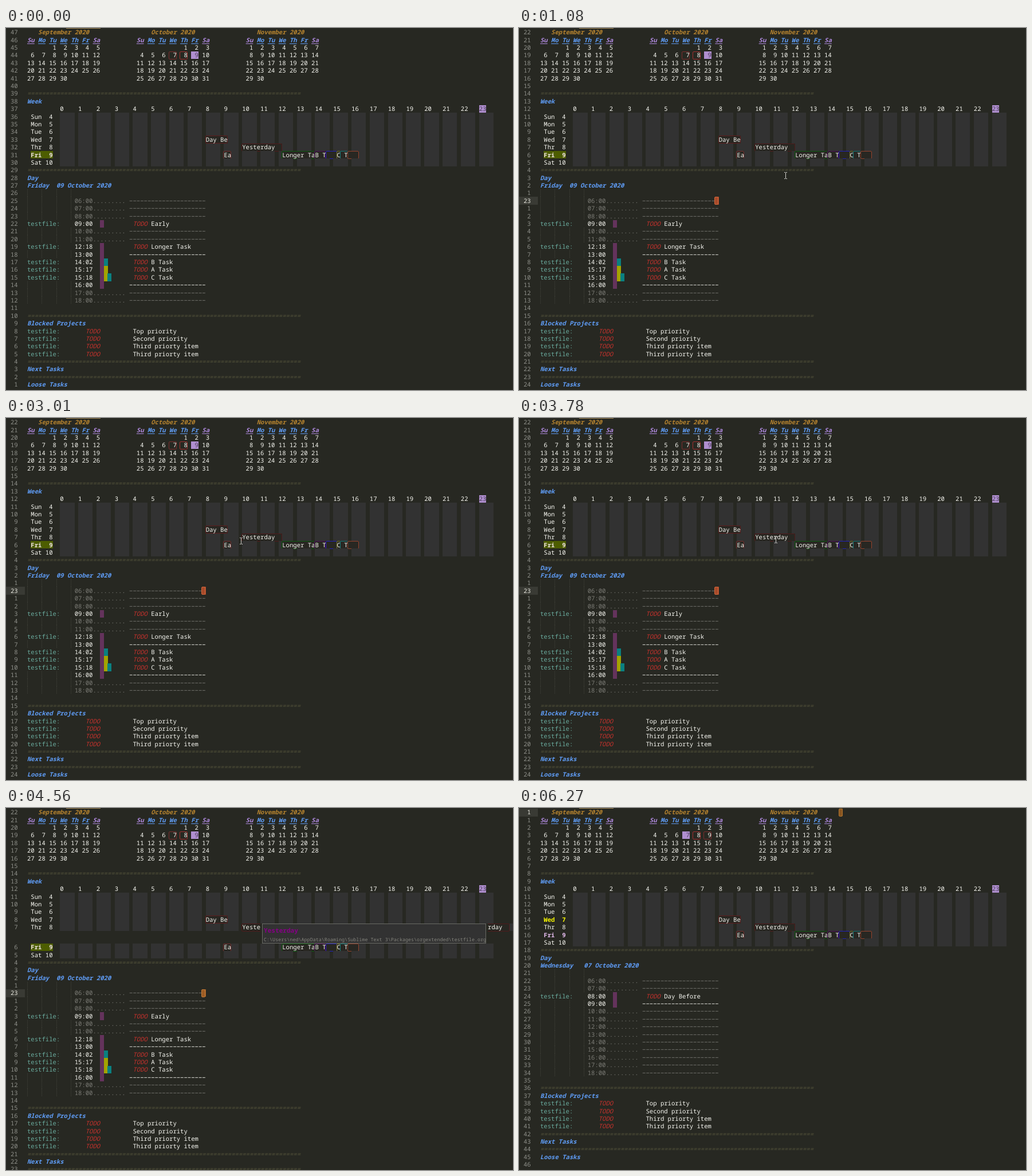
An HTML page with a canvas that plays this animation: 885 px wide and 633 px high, repeating every 8 s.

```html
<!DOCTYPE html>
<html lang="en">
<head>
<meta charset="utf-8">
<title>Agenda</title>
<style>
  html, body { margin: 0; width: 100%; height: 100%; overflow: hidden; background: #272822; }
  canvas { display: block; }
</style>
</head>
<body>
<canvas id="stage" width="885" height="633"></canvas>
<script>
const W = 885, H = 633, LOOP = 8000;
const CHAR = 6.36, LINE = 13.39, LEFT = 37, TOP = 7.5, SIZE = CHAR / 0.6;
const FONT = '"Noto Sans Mono", "DejaVu Sans Mono", monospace';
const C = {
  bg: '#272822', text: '#f8f8f2', dim: '#7c7c76', blue: '#5f9cf5', lilac: '#b08ae0',
  title: '#b5832f', rule: '#56553c', file: '#6aab9e', todo: '#c8322d', bar: '#323232',
  mark: '#b08fd0', plum: '#64335c', teal: '#0a8080', olive: '#a3a300', gutter: '#8f908a'
};
const DAYS = ['Sun', 'Mon', 'Tue', 'Wed', 'Thr', 'Fri', 'Sat'];
const MONTHS = [
  { name: 'September 2020', at: 3, col: 0, first: 2, days: 30 },
  { name: 'October 2020', at: 34, col: 30, first: 4, days: 31 },
  { name: 'November 2020', at: 63, col: 60, first: 0, days: 30 }
];
// day index, column, width in characters, label, border
const TASKS = [
  [3, 49, 6, 'Day Be', '#5c1c1c'],
  [4, 59, 11, 'Yesterday', '#4f1a1a'],
  [5, 54, 2, 'Ea', '#743030'],
  [5, 70, 9, 'Longer Ta', '#0b5a0f'],
  [5, 79, 3, 'B T', '#4b1058'],
  [5, 82, 3, '', '#2222b8'],
  [5, 85, 1, 'C', '#77772c'],
  [5, 86, 2, ' T', '#147a7a'],
  [5, 88, 3, '', '#94432d']
];
// blocks: column, agenda row, row count, colour
const VIEWS = {
  fri: {
    date: 9, heading: 'Friday  09 October 2020',
    slots: '06:00|07:00|08:00|09:00=Early|10:00|11:00|12:18=Longer Task|13:00+|14:02=B Task|15:17=A Task|15:18=C Task|16:00+|17:00|18:00',
    blocks: [[20, 3, 1, C.plum], [20, 6, 6, C.plum], [21, 8, 1, C.teal], [21, 9, 2, C.olive], [22, 10, 1, C.teal]]
  },
  thu: {
    date: 8, heading: 'Thursday    08 October 2020', dayColor: '#d8d500',
    slots: '06:00|07:00|08:00|09:00|10:02=Yesterday|11:00+|12:00+|13:00|14:00|15:00|16:00|17:00|18:00',
    blocks: [[20, 4, 3, C.plum]]
  },
  wed: {
    date: 7, heading: 'Wednesday   07 October 2020', dayColor: '#f8f800',
    slots: '06:00|07:00|08:00=Day Before|09:00+|10:00|11:00|12:00|13:00|14:00|15:00|16:00|17:00|18:00',
    blocks: [[20, 2, 2, C.plum]]
  }
};
const SCENES = [
  { from: 0, view: 'fri', number: i => 47 - i },
  { from: 700, view: 'fri', line: 22, caret: [48, '#a64a2a', '#d0663c'] },
  { from: 4160, view: 'fri', line: 22, caret: [48, '#9c5c24', '#c07a38'], popup: true },
  { from: 5720, view: 'thu', line: 0, caret: [82, '#8a5620', '#b0762f'] },
  { from: 6270, view: 'wed', line: 0, caret: [82, '#8a5620', '#b0762f'] }
];
// pointer moves: start, end, steps, path
const MOVES = [
  [70, 450, 6, [[764, 531], [518, 309]]],
  [700, 770, 2, [[517, 309], [516, 308]]],
  [1080, 1860, 11, [[465, 258], [400, 150], [330, 28], [310, 54]]],
  [1930, 2090, 3, [[300, 52], [281, 53]]],
  [2240, 2780, 8, [[297, 48], [414, 220]]],
  [3010, 3780, 11, [[410, 215], [377, 190], [400, 171], [435, 253], [448, 213]]]
];
const POINTER_HIDDEN = 4560;
const SPLIT_COL = 64, POPUP_SHIFT = 397, POPUP_GAP = 21.6;

const screen = document.getElementById('stage').getContext('2d');
const layer = document.createElement('canvas');
layer.width = W;
layer.height = H;
const g = layer.getContext('2d');
let gap = 0;

const x = col => LEFT + col * CHAR;
const y = row => TOP + row * LINE + (row > 15 ? gap : 0);

function rect(left, top, w, h, color) {
  g.fillStyle = color;
  g.fillRect(left, top, w, h);
}

// Edges snap to whole pixels so that neighbouring cells meet without seams.
function cells(col, row, w, h, color) {
  const left = Math.round(x(col)), top = Math.round(y(row) - LINE / 2);
  const right = Math.round(x(col + w)), bottom = Math.round(y(row) + (h - 0.5) * LINE);
  rect(left, top, right - left, bottom - top, color);
}

function outline(col, row, w, color) {
  g.strokeStyle = color;
  g.lineWidth = 1;
  g.beginPath();
  g.roundRect(Math.round(x(col)) - 0.5, Math.round(y(row) - LINE / 2) + 0.5, Math.round(w * CHAR), 13, 1.5);
  g.stroke();
}

function write(str, left, baseline, color, style = '', size = SIZE) {
  g.font = `${style} ${size}px ${FONT}`;
  g.fillStyle = color;
  [...str].forEach((ch, i) => {
    if (ch !== ' ') g.fillText(ch, left + i * size * 0.6, baseline);
  });
}

function put(str, col, row, color = C.text, style = '') {
  write(str, x(col), y(row) + 3.8, color, style);
}

const heading = (str, row) => put(str, 0, row, C.blue, 'italic bold');
const rule = row => put('='.repeat(75), 0, row, C.rule, 'italic');

function gutter(scene) {
  for (let i = 0; i < 47; i++) {
    const current = i === scene.line;
    if (current) rect(0, Math.round(y(i) - LINE / 2), 33, 14, '#393a34');
    const n = scene.number ? scene.number(i) : current ? i + 1 : Math.abs(i - scene.line);
    write(String(n).padStart(2), 8, y(i) + 3.8, current ? '#e8e8df' : C.gutter);
  }
}

function calendar(selected) {
  for (const m of MONTHS) {
    put(m.name, m.at, 0, C.title, 'italic bold');
    ['Su', 'Mo', 'Tu', 'We', 'Th', 'Fr', 'Sa'].forEach((d, i) => {
      const color = i % 6 ? C.blue : C.lilac;
      put(d, m.col + i * 3, 1, color, 'italic bold');
      rect(x(m.col + i * 3), 27, CHAR * 2, 1, color);
    });
    for (let d = 1; d <= m.days; d++) {
      const cell = m.first + d - 1, col = m.col + cell % 7 * 3, row = 2 + Math.floor(cell / 7);
      const busy = m.col === 30 && d >= 7 && d <= 9;
      const active = busy && d === selected;
      if (active) cells(col, row, 2, 1, C.mark);
      else if (busy) outline(col, row, 2, d === 8 ? '#a03030' : '#7c2d2d');
      put(String(d).padStart(2), col, row, active ? '#4b3d59' : C.text);
    }
  }
}

function weekBars(day) {
  const row = 11 + day;
  for (let h = 0; h < 24; h++) cells(9 + h * 5, row, 4, 1, C.bar);
  for (const [d, col, w, label, color] of TASKS) {
    if (d !== day) continue;
    cells(col, row, w, 1, '#282722');
    outline(col, row, w, color);
    put(label, col, row);
  }
}

function clipped(left, right, shift, draw) {
  g.save();
  g.beginPath();
  g.rect(left, 0, right - left, H);
  g.clip();
  g.translate(shift, 0);
  draw();
  g.restore();
}

function week(view, popup) {
  heading('Week', 9);
  for (let h = 0; h < 24; h++) {
    if (h === 23) cells(9 + h * 5, 10, 2, 1, C.mark);
    put(String(h), 9 + h * 5, 10, h === 23 ? '#4b3d59' : C.text);
  }
  DAYS.forEach((name, i) => {
    const date = i + 4, selected = date === view.date, today = date === 9;
    if (selected && today) cells(1, 11 + i, 6, 1, '#4d5d00');
    const color = selected && !today ? view.dayColor : today ? (selected ? '#f0e4e6' : '#e6bdf0') : C.text;
    put(`${name} ${String(date).padStart(2)}`, 1, 11 + i, color, selected || today ? 'bold' : '');
    if (popup && i === 4) {
      clipped(0, x(SPLIT_COL), 0, () => weekBars(i));
      clipped(x(SPLIT_COL) + POPUP_SHIFT, W, POPUP_SHIFT, () => weekBars(i));
    } else weekBars(i);
  });
}

function guides(row) {
  g.fillStyle = '#41423b';
  for (let col = 0; col <= 12; col += 4) {
    for (let dy = 0; dy < LINE; dy += 2) {
      g.fillRect(Math.round(x(col)), Math.round(y(row) - LINE / 2 + dy), 1, 1);
    }
  }
}

function agenda(view) {
  const first = 22, slots = view.slots.split('|');
  heading('Day', 19);
  heading(view.heading, 20);
  guides(21);
  slots.forEach((slot, i) => {
    const row = first + i, [time, task] = slot.split('=');
    const busy = task || time.endsWith('+');
    const color = busy ? C.text : C.dim;
    put(time.slice(0, 5) + (busy ? '' : '.........'), 13, row, color);
    if (task) {
      put('testfile:', 0, row, C.file);
      put('TODO', 29, row, C.todo, 'italic');
      put(task, 34, row);
    } else {
      guides(row);
      put('\u2212'.repeat(21), 28, row, color);
    }
  });
  for (const [col, row, n, color] of view.blocks) cells(col, first + row, 1.1, n, color);
  return first + slots.length;
}

function projects(row) {
  rule(row + 1);
  heading('Blocked Projects', row + 2);
  ['Top priority', 'Second priority', 'Third priorty item', 'Third priorty item'].forEach((name, i) => {
    put('testfile:', 0, row + 3 + i, C.file);
    put('TODO', 16, row + 3 + i, C.todo, 'italic');
    put(name, 29, row + 3 + i);
  });
  rule(row + 7);
  heading('Next Tasks', row + 8);
  rule(row + 9);
  heading('Loose Tasks', row + 10);
}

function popupBox() {
  rect(447, 202, 391, 35, '#323232');
  g.strokeStyle = '#696a64';
  g.lineWidth = 1;
  g.strokeRect(447.5, 202.5, 390, 34);
  write('Yesterday', 450, 217.5, '#850085', 'bold', 11.1);
  write('C:\\Users\\ned\\AppData\\Roaming\\Sublime Text 3\\Packages\\orgextended\\testfile.org',
    450, 233, '#85857e', '', 8.4);
}

function drawScene(scene) {
  const view = VIEWS[scene.view];
  gap = scene.popup ? POPUP_GAP : 0;
  g.textRendering = 'geometricPrecision';
  rect(0, 0, W, H, C.bg);
  rect(105, 0, 60, 1, '#a58a58');
  gutter(scene);
  calendar(view.date);
  rule(8);
  week(view, scene.popup);
  rule(18);
  projects(agenda(view));
  if (scene.caret) {
    const [col, fill, edge] = scene.caret;
    cells(col, scene.line, 1, 1, fill);
    outline(col, scene.line, 1, edge);
  }
  if (scene.popup) popupBox();
}

function pointerAt(t) {
  const move = MOVES.findLast(m => t >= m[0]);
  if (!move || t >= POINTER_HIDDEN) return null;
  const [start, end, steps, path] = move;
  const step = Math.floor(Math.min(1, (t - start) / (end - start)) * (steps - 1) + 1e-6);
  const pos = step / (steps - 1) * (path.length - 1);
  const i = Math.min(Math.floor(pos), path.length - 2);
  return path[i].map((v, k) => v + (path[i + 1][k] - v) * (pos - i));
}

function drawPointer([px, py]) {
  const cx = Math.round(px), top = Math.round(py) - 6;
  screen.fillStyle = '#d0d0cc';
  screen.fillRect(cx, top + 1, 1, 10);
  for (const edge of [top, top + 11]) {
    screen.fillRect(cx - 2, edge, 2, 1);
    screen.fillRect(cx + 1, edge, 2, 1);
  }
}

const began = performance.now();
let shown = null;

function frame() {
  const t = (performance.now() - began) % LOOP;
  const scene = SCENES.findLast(s => t >= s.from);
  if (scene !== shown) drawScene(shown = scene);
  screen.drawImage(layer, 0, 0);
  const pointer = pointerAt(t);
  if (pointer) drawPointer(pointer);
  requestAnimationFrame(frame);
}
frame();
</script>
</body>
</html>
```
